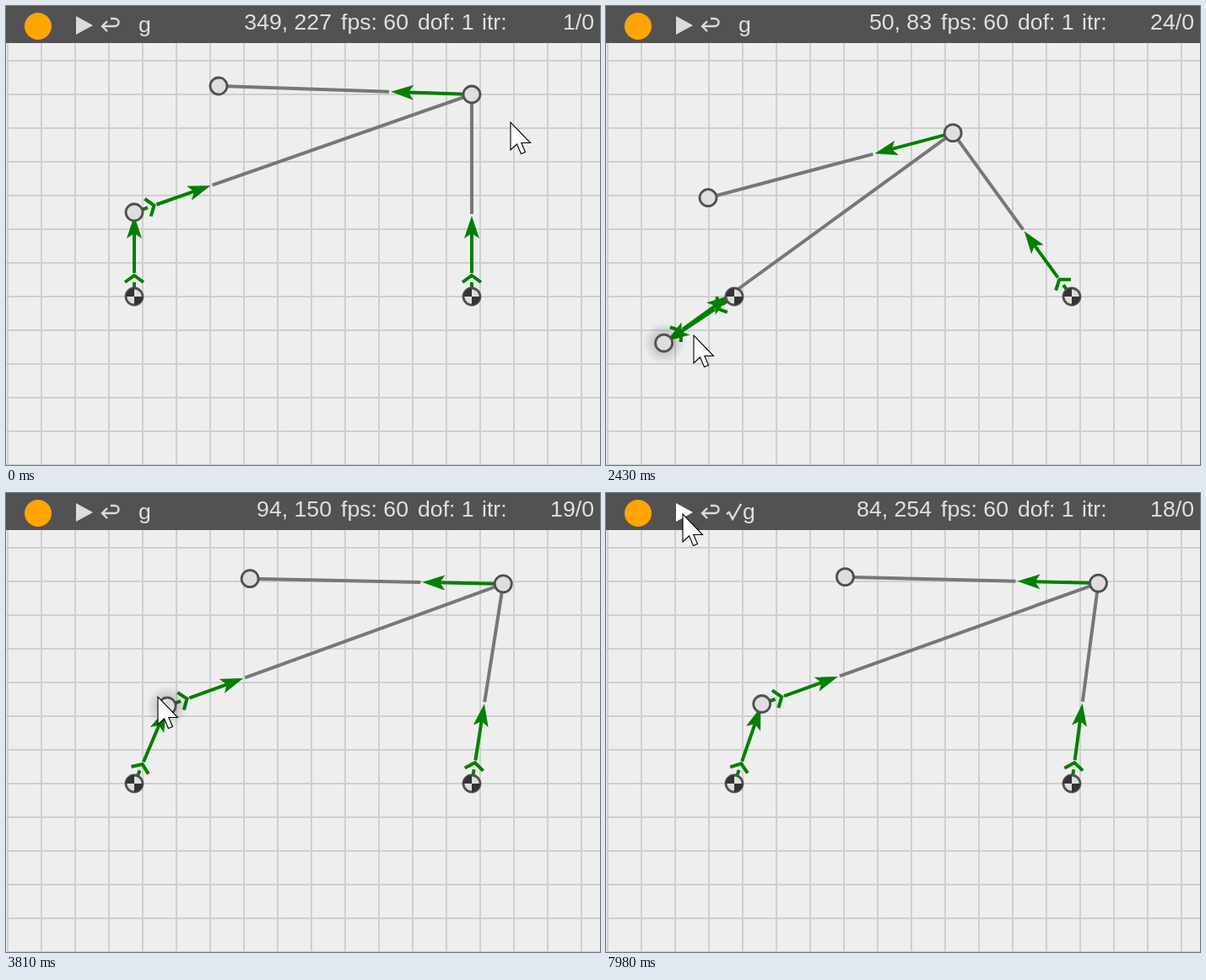
These frames come from a looping animation (704x545 px, 8000 ms). An HTML page:

```html
<!DOCTYPE html>
<html lang="en">
<head>
<meta charset="utf-8">
<title>Four-bar linkage</title>
<style>
  html, body { margin: 0; width: 100%; height: 100%; overflow: hidden; background: #eee; }
  svg { display: block; width: 704px; height: 545px; }
  .bar text { font: 26.67px "Liberation Sans", Arial, sans-serif; fill: #e0e0e0; }
  .end { text-anchor: end; }
  .icon { fill: #dcdcdc; stroke: none; }
  .stroke { fill: none; stroke: #dcdcdc; stroke-width: 2.4; }
  .bar .icon.hot { fill: #fff; }
  .bar .stroke.hot { stroke: #fff; }
  .bar text.hot { fill: #fff; }
  .bone { stroke: #777; stroke-width: 4; }
  .shaft { fill: none; stroke: #008000; stroke-width: 4; }
  .head { fill: #008000; }
  .joint { fill: #dedede; stroke: #505050; stroke-width: 2.8; }
  .tip rect { fill: #f6ffff; stroke: #333; stroke-width: 2; }
  .tip text { font: 23.3px "Open Sans", "Noto Sans", sans-serif; fill: #444; }
</style>
</head>
<body>
<svg viewBox="0 0 704 545">
  <defs>
    <pattern id="grid" x="1" y="64" width="40" height="40" patternUnits="userSpaceOnUse">
      <path d="M1 0V40M0 1H40" stroke="#cfcfcf" stroke-width="2"/>
    </pattern>
    <radialGradient id="glow">
      <stop offset=".4" stop-color="#000" stop-opacity=".17"/>
      <stop offset="1" stop-color="#000" stop-opacity="0"/>
    </radialGradient>
    <g id="hub">
      <circle class="joint" r="10"/>
      <path d="M0 -10A10 10 0 0 0 -10 0H10A10 10 0 0 1 0 10Z" fill="#333"/>
    </g>
  </defs>

  <rect width="704" height="545" fill="#eee"/>
  <rect width="704" height="545" fill="url(#grid)"/>
  <g id="links"></g>
  <circle id="halo" r="25" fill="url(#glow)"/>
  <use href="#hub" x="152" y="345"/>
  <use href="#hub" x="552" y="345"/>
  <circle id="jointA" class="joint" r="10"/>
  <circle id="jointB" class="joint" r="10"/>
  <circle id="jointC" class="joint" r="10"/>

  <g class="bar">
    <rect width="704" height="44" fill="#525252"/>
    <circle cx="38" cy="24" r="16" fill="#ffa500"/>
    <path id="play" class="icon" d="M83 12L103 23L83 34Z"/>
    <path id="reset" class="stroke" d="M120 18L114 24L120 30M114 24H129A4.5 4.5 0 0 0 129 15H124"/>
    <path id="check" class="stroke" d="M143 25L146 23L150 31L160 13"/>
    <text id="gravity" y="31">g</text>
    <text id="coords" class="end" x="386" y="28"></text>
    <text x="397" y="28">fps: 60</text>
    <text x="488" y="28">dof: 1</text>
    <text x="564" y="28">itr:</text>
    <text id="steps" class="end" x="697" y="28"></text>
  </g>

  <g id="tip" class="tip">
    <rect x="1" y="1" height="48"/>
    <text x="16" y="34"></text>
  </g>
  <path id="cursor" d="M0 0V33L7.5 26L12.5 37.5L17.5 35.5L12.8 24.5H23.5Z" fill="#fff" stroke="#000" stroke-width="1.1"/>
</svg>

<script>
const LOOP = 8000, STEP = 30, LAG = 60, LEAVE = 4500;
const byId = id => document.getElementById(id);

// Monotone cubic through [time, value] keys, held constant outside them.
function track(keys) {
  const secant = i => (keys[i + 1][1] - keys[i][1]) / (keys[i + 1][0] - keys[i][0]);
  const last = keys.length - 1;
  const slope = keys.map((k, i) => {
    if (i === 0) return secant(0);
    if (i === last) return secant(last - 1);
    const a = secant(i - 1), b = secant(i);
    return a * b > 0 ? 2 * a * b / (a + b) : 0;
  });
  return t => {
    if (t <= keys[0][0]) return keys[0][1];
    if (t >= keys[last][0]) return keys[last][1];
    let i = 0;
    while (t >= keys[i + 1][0]) i++;
    const [t0, p] = keys[i], [t1, q] = keys[i + 1], h = t1 - t0, s = (t - t0) / h;
    return p + s * s * (3 - 2 * s) * (q - p)
      + h * s * (1 - s) * ((1 - s) * slope[i] - s * slope[i + 1]);
  };
}

const path = [
  [-60, 698, 101], [0, 598, 138], [150, 410, 225], [300, 310, 276], [450, 250, 298],
  [600, 203, 285], [810, 166, 253], [930, 150, 249], [1350, 150, 249],
  [1830, 112, 271], [1890, 101, 281], [2160, 84, 336], [2370, 100, 389], [2430, 104, 391],
  [2660, 155, 430], [2880, 224, 393], [2940, 230, 362], [3030, 240, 320],
  [3250, 238, 285], [3550, 215, 268], [3750, 188, 255], [3810, 180, 242],
  [4140, 180, 241], [4300, 173, 180], [LEAVE, 168, 47], [4740, 170, 25],
  [4950, 170, 25], [5040, 167, 25], [6390, 167, 25], [6600, 124, 25], [6780, 91, 25]
];
const cursorX = track(path.map(k => [k[0], k[1]]));
const cursorY = track(path.map(k => [k[0], k[2]]));
const crank = track([
  [1350, 90], [1890, 110], [2160, 139.5], [2430, 213.5], [2680, 268], [2940, 321.5],
  [2970, 330.7], [3250, 384], [3550, 409], [3810, 427], [3870, 430.9]
]);
const solver = track([[1350, 1], [1380, 6], [1890, 15], [2430, 24], [2940, 21], [3810, 19], [3870, 18]]);

// Linkage geometry
const A0 = [152, 345], B0 = [552, 345];
const CRANK = 100, ROCKER = 240, COUPLER = Math.hypot(400, 140);
const ARM = Math.hypot(300, 10), ARM_TURN = Math.atan2(-10, -300) - Math.atan2(-140, 400);
const polar = ([x, y], r, w) => [x + r * Math.cos(w), y + r * Math.sin(w)];

function pose(t) {
  const A = polar(A0, CRANK, -crank(t) * Math.PI / 180);
  const dx = B0[0] - A[0], dy = B0[1] - A[1], d = Math.hypot(dx, dy);
  const open = Math.acos((COUPLER ** 2 + d * d - ROCKER ** 2) / (2 * COUPLER * d));
  const w = Math.atan2(dy, dx) - open;
  const B = polar(A, COUPLER, w);
  return { A, B, C: polar(B, ARM, w + ARM_TURN) };
}

// A link lies along +x from its base joint and is placed by a transform.
function makeLink(length, driven) {
  const g = document.createElementNS("http://www.w3.org/2000/svg", "g");
  const tail = driven ? "M0 0H17M17 -11L25 0L17 11M28 0H78" : "M0 0H78";
  g.innerHTML = (length > 100 ? `<path class="bone" d="M98 0H${length}"/>` : "")
    + `<path class="shaft" d="${tail}"/><path class="head" d="M96 0L69 -9L75 0L69 9Z"/>`;
  byId("links").append(g);
  return (p, q) => {
    const w = Math.atan2(q[1] - p[1], q[0] - p[0]) * 180 / Math.PI;
    g.setAttribute("transform", `translate(${p}) rotate(${w})`);
  };
}
const crankLink = makeLink(CRANK, true);
const couplerLink = makeLink(COUPLER, true);
const rockerLink = makeLink(ROCKER, true);
const armLink = makeLink(ARM, false);

const place = (id, p) => byId(id).setAttribute("transform", `translate(${p})`);
const show = (id, on) => byId(id).setAttribute("visibility", on ? "visible" : "hidden");

function showTip(x, width, label) {
  place("tip", [x + 20, 53]);
  byId("tip").children[0].setAttribute("width", width - 2);
  byId("tip").children[1].textContent = label;
}

function draw(t) {
  const { A, B, C } = pose(t);
  crankLink(A0, A);
  couplerLink(A, B);
  rockerLink(B0, B);
  armLink(B, C);
  place("jointA", A);
  place("jointB", B);
  place("jointC", C);
  place("halo", A);
  show("halo", t >= 870 && t < 4230);

  const x = cursorX(t), y = cursorY(t), seen = Math.min(t - LAG, LEAVE);
  place("cursor", [x, y]);
  byId("coords").textContent =
    `${Math.round(cursorX(seen) / 2)}, ${Math.round((555 - cursorY(seen)) / 2)}`;
  byId("steps").textContent = `${Math.round(solver(t))}/0`;

  const heavy = t >= 6060;
  show("check", heavy);
  byId("gravity").setAttribute("x", heavy ? 162 : 157);
  const hover = (id, from, to) => byId(id).classList.toggle("hot", y < 45 && x >= from && x <= to);
  hover("play", 82, 104);
  hover("reset", 112, 136);
  hover("check", 142, 177);
  hover("gravity", 142, 177);

  const first = t >= 5190 && t < 5940, second = t >= 7230 && t < 7980;
  show("tip", first || second);
  if (first) showTip(x, 178, "gravity on/off");
  if (second) showTip(x, 140, "run/pause");
}

const start = performance.now();
function tick() {
  const t = (performance.now() - start) % LOOP;
  draw(Math.floor(t / STEP) * STEP);
  requestAnimationFrame(tick);
}
tick();
</script>
</body>
</html>
```
